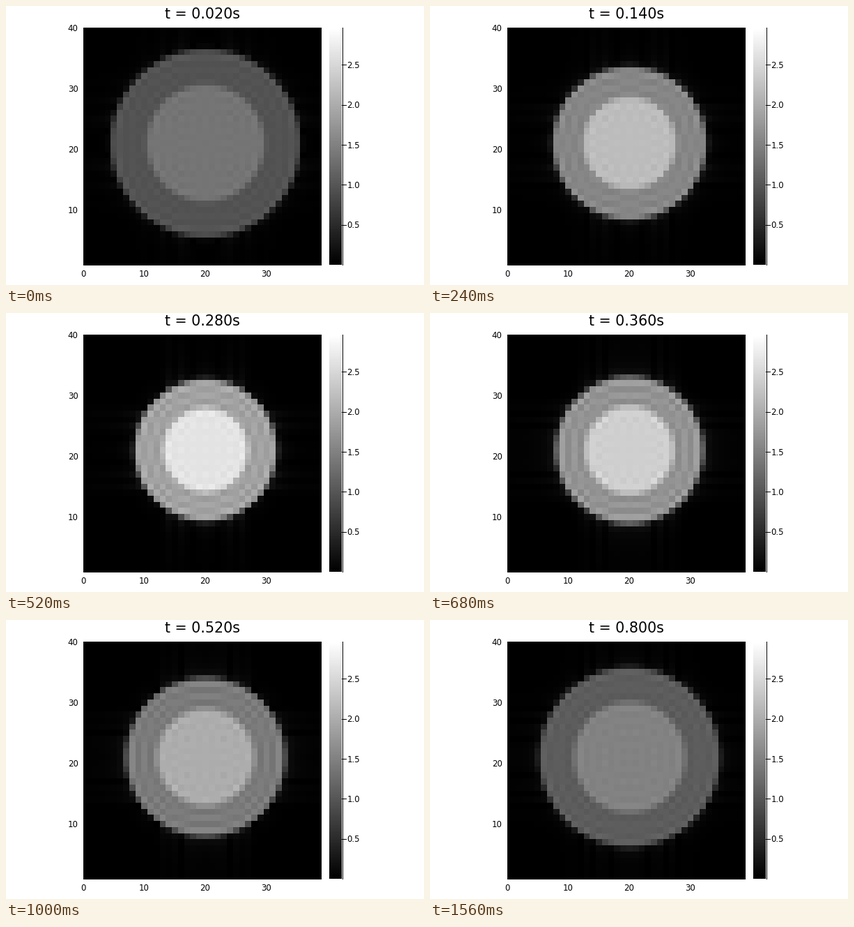
Animation of 600x400 px, one loop 1600 ms. Source, as a matplotlib script:

```python
import numpy as np
import matplotlib.pyplot as plt
from matplotlib.animation import FuncAnimation

W, H, DPI = 600, 400, 100
FRAMES, INTERVAL = 40, 40
N, OVER = 40, 10                      # image matrix and oversampling
R_OUT, R_IN = 16.0, 9.95              # relaxed radii in pixels
V_RING, V_BLOOD = 0.90, 1.265         # relaxed signal levels
V_MAX = 2.966
PEAK, PERIOD = 0.2, 1.0               # contraction end, cycle length in s
LEFT, RIGHT, TOP, BOTTOM = 111, 452, 31, 371
BAR_LEFT, BAR_RIGHT = 464, 482

axis = (np.arange(N * OVER) - N * OVER // 2) / OVER
dist = np.hypot(*np.meshgrid(axis, axis))


def contraction(t):
    """Triangle wave: quick squeeze, slow release."""
    return t / PEAK if t <= PEAK else (PERIOD - t) / (PERIOD - PEAK)


def disc(radius):
    return np.clip((radius - dist) * OVER + 0.5, 0, 1)


def heart(t):
    """Ring and blood pool, band-limited to the coarse matrix."""
    p = contraction(t)
    density = (1 - 0.343 * p) ** -2
    fine = V_RING * disc(R_OUT * (1 - 0.3 * p))
    fine += (V_BLOOD - V_RING) * disc(R_IN * (1 - 0.343 * p))
    k = np.fft.fftshift(np.fft.fft2(np.fft.ifftshift(fine * density)))
    lo = (N * OVER - N) // 2
    k = k[lo:lo + N, lo:lo + N]
    image = np.fft.fftshift(np.fft.ifft2(np.fft.ifftshift(k)))
    return np.abs(image) / OVER ** 2


def panel(x0, x1):
    ax = fig.add_axes([x0 / W, 1 - BOTTOM / H, (x1 - x0) / W, (BOTTOM - TOP) / H])
    ax.axis("off")
    return ax


def label(x, y, text, size=11.8, ha="center"):
    return page.text(x, y, text, fontsize=size * 72 / DPI, ha=ha,
                     va="baseline", family="DejaVu Sans", color="black")


fig = plt.figure(figsize=(W / DPI, H / DPI), dpi=DPI, facecolor="white")

view = panel(LEFT, RIGHT)
picture = view.imshow(heart(0.02), cmap="gray", vmin=0, vmax=V_MAX,
                      origin="lower", interpolation="nearest", aspect="auto",
                      extent=(-0.5, N - 0.5, 0.5, N + 0.5))
view.set_xlim(0, N - 1)
view.set_ylim(1, N)

bar = panel(BAR_LEFT, BAR_RIGHT)
bar.imshow(np.linspace(0, 1, 256)[:, None], cmap="gray", vmin=0, vmax=1,
           origin="lower", aspect="auto")

page = fig.add_axes([0, 0, 1, 1])
page.set_xlim(0, W)
page.set_ylim(H, 0)
page.axis("off")

line = dict(color="black", lw=1 * 72 / DPI)
page.plot([LEFT, RIGHT], [BOTTOM, BOTTOM], **line)
page.plot([LEFT, LEFT], [TOP, BOTTOM], **line)
page.plot([BAR_RIGHT + 0.5] * 2, [TOP, BOTTOM], **line)

for v in range(0, 40, 10):
    label(LEFT + v * (RIGHT - LEFT) / 39, 388, str(v))
for v in range(10, 50, 10):
    label(103.5, BOTTOM - (v - 1) * (BOTTOM - TOP) / 39 + 4.5, str(v), ha="right")
for v in np.arange(0.5, 3, 0.5):
    y = BOTTOM - v / V_MAX * (BOTTOM - TOP)
    page.plot([BAR_RIGHT, 488], [y, y], **line)
    label(489.5, y + 4.5, f"{v:.1f}", ha="left")

title = label(282, 18, "", size=20.7)


def draw(i):
    t = 0.02 * (i + 1)
    picture.set_data(heart(t))
    title.set_text(f"t = {t:.3f}s")
    return picture, title


anim = FuncAnimation(fig, draw, frames=FRAMES, interval=INTERVAL,
                     repeat=True, repeat_delay=0)
plt.show()
```
